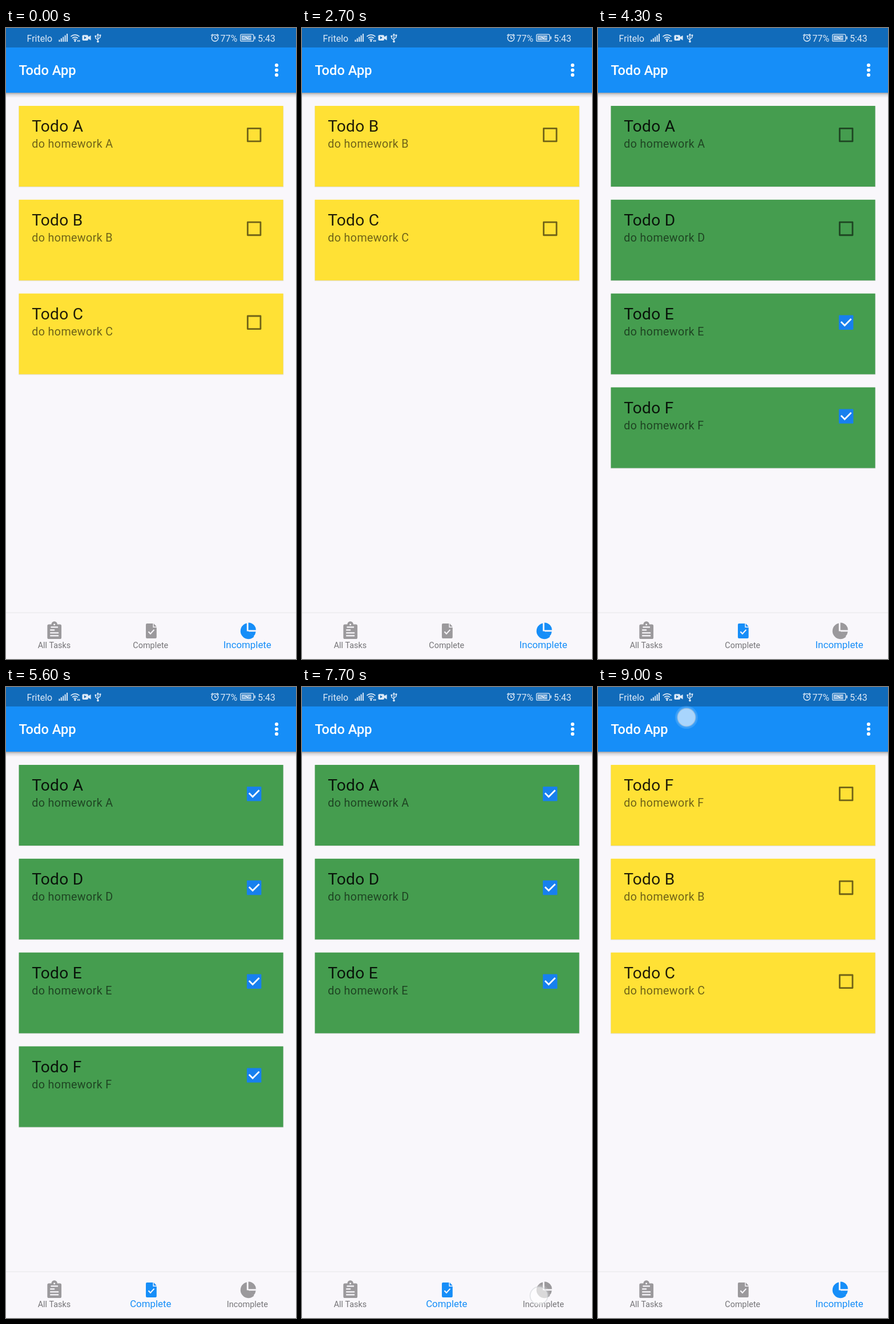
An HTML page for the animation above (9.1 s loop, 508 px wide and 1102 px high).

```html
<!DOCTYPE html>
<html lang="en">
<head>
<meta charset="utf-8">
<title>Todo App</title>
<style>
  html, body { margin: 0; width: 100%; height: 100%; overflow: hidden; background: #f9f7fb; }
  svg { display: block; width: 100%; height: 100%; font-family: Roboto, sans-serif; }
  .title { font-size: 28.2px; letter-spacing: .2px; fill: rgba(0, 0, 0, .87); }
  .note { font-size: 19.75px; letter-spacing: .35px; fill: rgba(0, 0, 0, .56); }
  .status { font-size: 16px; fill: #dbe9f7; }
  .line { fill: none; stroke: #dbe9f7; }
</style>
</head>
<body>
<svg viewBox="0 0 508 1102" xmlns="http://www.w3.org/2000/svg">
  <defs>
    <linearGradient id="shade" x2="0" y2="1">
      <stop stop-color="#000" stop-opacity=".34"/>
      <stop offset=".4" stop-color="#000" stop-opacity=".12"/>
      <stop offset="1" stop-color="#000" stop-opacity="0"/>
    </linearGradient>
  </defs>
  <rect width="508" height="1102" fill="#f9f7fb"/>
  <rect y="113" width="508" height="9" fill="url(#shade)"/>
  <rect width="508" height="113" fill="#168ef8"/>
  <rect width="508" height="34" fill="#116bba"/>

  <g class="status">
    <text x="36.5" y="23.5">Fritelo</text>
    <text x="375.5" y="23.5">77%</text>
    <text x="441" y="23.5">5:43</text>
    <path d="M92.5 20.5h2V24h-2zM95.9 18h2v6h-2zM99.3 15.5h2V24h-2zM102.7 12.8h2V24h-2zM106.1 10h2v14h-2z"/>
    <circle cx="121" cy="22.5" r="1.7"/>
    <path class="line" stroke-width="1.7" d="M113.5 14.8q7.5-6 15 0M116 17.8q5-4 10 0M118.4 20.2q2.6-1.8 5.2 0"/>
    <path d="M125.2 21h1.6v3h-1.6zM127.8 21h1.6v3h-1.6z"/>
    <rect x="133.5" y="12.3" width="10.5" height="9.6" rx="2"/>
    <path d="M144 15.6l4.7-2.6v8.4l-4.7-2.6z"/>
    <path fill="#116bba" d="M137 14.6l4 2.5-4 2.5z"/>
    <path class="line" stroke-width="1.4" d="M161 12v11M161 21l-4-3v-3M161 19.5l4-3v-3"/>
    <path d="M158.7 13l2.3-3.8 2.3 3.8zM155.6 13h2.8v2.8h-2.8zM163.6 11.5h2.8v2.8h-2.8z"/>
    <circle cx="161" cy="23.6" r="1.9"/>
    <circle class="line" stroke-width="1.5" cx="366" cy="17.5" r="5.7"/>
    <path class="line" stroke-width="1.5" d="M366 14v4h3M359.3 13.4l3.2-2.8M372.7 13.4l-3.2-2.8"/>
    <rect class="line" stroke-width="1.3" x="410.7" y="11.2" width="23" height="12" rx="2"/>
    <rect x="412.6" y="13" width="17" height="8.4" opacity=".75"/>
    <path fill="#fff" stroke="#116bba" stroke-width=".6" d="M415 17.4l7-3.4v2.4h6.5l-7.5 4v-3z"/>
    <rect x="435" y="14.7" width="1.8" height="5"/>
  </g>

  <text x="22.6" y="82" font-size="23.7" font-weight="500" fill="#fff">Todo App</text>
  <g fill="#fff"><circle cx="474" cy="65" r="3.1"/><circle cx="474" cy="73.5" r="3.1"/><circle cx="474" cy="82" r="3.1"/></g>
  <rect y="1020.5" width="508" height="1.5" fill="#ecebee"/>
  <g id="scene"></g>
</svg>
<script>
const DURATION = 9100, STEP = 100;
const BLUE = '#168ef8', GRAY = '#757477', ICON_GRAY = '#9b999c';
const YELLOW = '#ffe135', GREEN = '#459d4f';

const lists = [
  { until: 2500, names: 'ABC', color: YELLOW },
  { until: 4300, names: 'BC', color: YELLOW },
  { until: 6800, names: 'ADEF', color: GREEN },
  { until: 7800, names: 'ADE', color: GREEN },
  { until: DURATION, names: 'FBC', color: YELLOW }
];
const touches = [
  { from: 2300, to: 2500, x: 444, y: 178.5 },
  { from: 4000, to: 4300, x: 254.5, y: 1062 },
  { from: 6400, to: 6800, x: 429, y: 678.5 },
  { from: 7500, to: 7800, x: 415, y: 1063 },
  { from: 9000, to: DURATION, x: 155, y: 53 }
];

const progress = (t, start) => Math.min(1, Math.max(0, (t - start) / 200));
const ease = p => 1 - (1 - p) ** 2 * (1 + 2 * p);
const mix = (a, b, p) => `color-mix(in srgb, ${b} ${p * 100}%, ${a})`;

function checkbox(cx, cy, p) {
  const size = 25.4 * (0.9 + 0.1 * Math.abs(2 * p - 1));
  const fill = Math.min(1, 2 * p);
  const color = mix('rgb(0 0 0 / .56)', '#1780ee', fill);
  const corner = `translate(${cx - size / 2} ${cy - size / 2})`;
  if (p < 0.5) {
    const w = 2.82 + (size / 2 - 2.82) * fill, inner = size - w;
    return `<rect transform="${corner}" x="${w / 2}" y="${w / 2}" width="${inner}" height="${inner}"
      fill="none" stroke-width="${w}" stroke-linejoin="round" style="stroke:${color}"/>`;
  }
  const tick = p > 0.5 ? `<path d="M3.8 11.4l6.4 6.4L21.6 6.4" fill="none" stroke="#fff" stroke-width="2.82"
    pathLength="1" stroke-dasharray="${2 * p - 1} 2"/>` : '';
  return `<g transform="${corner}"><rect width="${size}" height="${size}" rx="1.2" style="fill:${color}"/>${tick}</g>`;
}

function card(name, i, color, checked) {
  const y = 136 + i * 163.85;
  return `<rect x="22.2" y="${y + 0.6}" width="464" height="141.4" fill="#000" opacity=".1"/>
    <rect x="22.6" y="${y}" width="463" height="141" fill="${color}"/>
    <text class="title" x="45.2" y="${y + 45}">Todo ${name}</text>
    <text class="note" x="45.2" y="${y + 73}">do homework ${name}</text>
    ${checkbox(434.6, y + 50.6, checked)}`;
}

const icons = {
  clipboard: `<path fill-rule="evenodd" d="M75 1041.5h4.5a5.2 5.2 0 0 1 10.4 0H94.5a2.6 2.6 0 0 1 2.6 2.6v20.3a2.6 2.6 0 0 1-2.6 2.6H75a2.6 2.6 0 0 1-2.6-2.6v-20.3a2.6 2.6 0 0 1 2.6-2.6z"/>
    <circle cx="84.7" cy="1041.8" r="1.5" fill="#f9f7fb"/>
    <path fill="none" stroke="#f9f7fb" stroke-width="2.2" d="M78.5 1046.3h12.6M77.2 1051.4h8M77.2 1056.4h15M77.2 1061.4h15"/>`,
  file: `<path d="M247 1040h10.4v7h6.4v17a2 2 0 0 1-2 2H247a2 2 0 0 1-2-2v-22a2 2 0 0 1 2-2zM258.8 1040l5 5.4h-5z"/>
    <path fill="none" stroke="#f9f7fb" stroke-width="2.1" d="M249.5 1054.3l3.5 3.6 6.5-7"/>`,
  pie: `<path d="M421.8 1039.5v13.9h3l9.8 9.7a14 14 0 1 1-12.8-23.6z"/>
    <path d="M424.6 1038.4a13.2 13.2 0 0 1 13.2 13.2h-13.2zM425.2 1054.2h12.4a14 14 0 0 1-4 8.4z"/>`
};

function tab(label, x, icon, active, selected) {
  return `<g fill="${active ? BLUE : ICON_GRAY}">${icons[icon]}</g>
    <text x="${x}" y="${1083 - 0.5 * selected}" text-anchor="middle" font-size="${14.45 + 2.4 * selected}"
      style="fill:${mix(GRAY, BLUE, selected)}">${label}</text>`;
}

function touch({ x, y }) {
  return `<circle cx="${x}" cy="${y}" r="20" fill="#fff" opacity=".13"/>
    <circle cx="${x}" cy="${y}" r="17.5" fill="#fff" opacity=".1"/>
    <circle cx="${x}" cy="${y}" r="15.5" fill="rgb(255 255 255 / .52)" stroke="rgb(190 195 200 / .42)" stroke-width="1.8"/>`;
}

function draw(t) {
  const { names, color } = lists.find(list => t < list.until);
  const green = color === GREEN;
  const checked = i => t >= 7800 ? 1 - progress(t, 7800)
    : !green ? 0 : i < 2 ? progress(t, 4300) : 1;
  const complete = ease(progress(t, 4300)) - ease(progress(t, 7800));
  return [...names].map((name, i) => card(name, i, color, checked(i))).join('')
    + tab('All Tasks', 84.5, 'clipboard', false, 0)
    + tab('Complete', 253.3, 'file', green, complete)
    + tab('Incomplete', 422.8, 'pie', !green, 1 - complete)
    + touches.filter(p => t >= p.from && t < p.to).map(touch).join('');
}

const scene = document.getElementById('scene');
const start = performance.now();
let shown = -1;

function tick() {
  const t = Math.floor((performance.now() - start) % DURATION / STEP) * STEP;
  if (t !== shown) scene.innerHTML = draw(shown = t);
  requestAnimationFrame(tick);
}
tick();
</script>
</body>
</html>
```
